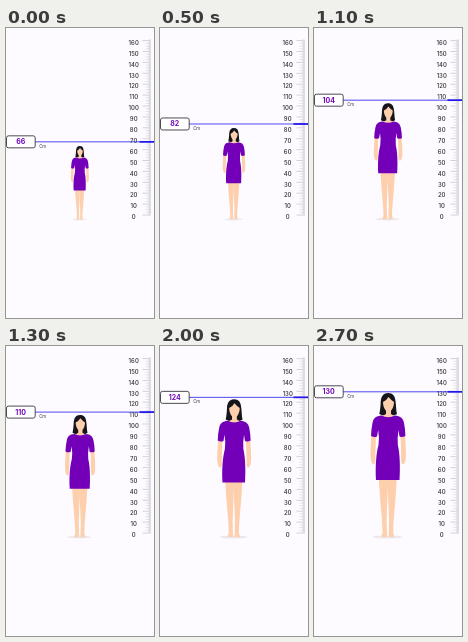
Recreate the animation shown at these times as an HTML page. Size 148 by 290 pixels, loop 3200 ms.

```html
<!DOCTYPE html>
<html lang="en">
<head>
<meta charset="utf-8">
<title>Height picker</title>
<style>
  html, body { margin: 0; width: 100%; height: 100%; overflow: hidden; background: #fdfbff; }
  svg { display: block; width: 148px; height: 290px; }
  text { font-family: Inter, sans-serif; text-anchor: middle; fill: #333; }
  #ruler text { font-size: 6px; font-weight: 500; }
  #value { font-size: 7px; font-weight: 700; fill: #7209b7; }
  #unit { font-size: 4.3px; }
</style>
</head>
<body>
<svg viewBox="0 0 148 290">
  <rect width="148" height="290" fill="#fdfbff"/>
  <g id="ruler"><rect x="142.5" y="11.5" width="2.5" height="176" fill="#dedce2"/></g>
  <g id="figure">
    <ellipse cx="73.5" cy="191" rx="14.5" ry="1.6" fill="#ebe7ec"/>
    <path fill="#17151c" d="M74 47C69 47 67 51 66.700 56C66.500 61 66 65 65.300 68Q69 70.500 74 69.500Q80 70.500 83 68C82 65 82.300 60 81.500 55C81 50 79 47 74 47Z"/>
    <g fill="#fdcfad">
      <path d="M57.500 88C57 98 56 107 56.800 113Q57.500 118 60 118.500Q61.800 117 61.300 111L62 88ZM91 88C91.500 98 92.500 107 91.700 113Q91 118 88.500 118.500Q86.700 117 87.200 111L86.500 88Z"/>
      <path d="M64.800 132H73.800C74 146 73 160 72.600 174L73 191H67.500Q67.300 189 68.500 187C68.700 174 66 158 64.800 132ZM73.800 132H82.800C81.500 158 79.200 174 79.200 187Q80.300 189 80 191H74.700L75 174C74.600 160 73.600 146 73.800 132Z"/>
      <path d="M72 61H77V68L81 70.500Q74.500 74 67.500 70.500L72 68Z"/>
      <path d="M69 56Q72.500 54.500 74.500 51Q77 54 80 56C80 61 77.500 65.800 74.500 65.800S69 61 69 56Z"/>
    </g>
    <path fill="#7300b8" d="M67.500 69.500Q74.300 73 81 69.500C86 70 89 72 90 77Q91.300 83 91.400 90Q88.500 91.800 85.500 90.500L84.500 84Q83.200 92 83.800 99C86 108 86.300 122 85.500 134H62C61.200 122 62 108 64.500 99Q65.500 92 64.200 84L63 90.500Q60 91.800 57 90Q57.200 83 58.500 77C59.500 72 62 70 67.500 69.500Z"/>
  </g>
  <g id="marker">
    <path d="M29 0H148" stroke="#3c35f2" stroke-width=".9"/>
    <path d="M133.500 0H148" stroke="#2217ea" stroke-width="1.7"/>
    <rect x=".5" y="-6" width="28.700" height="12" rx="2" fill="#fff" stroke="#39373f" stroke-width=".9"/>
    <text id="value" x="14.700" y="2.500"></text>
    <text id="unit" x="36.700" y="5.800">Cm</text>
  </g>
</svg>
<script>
  const LOOP = 3200, STEP = 100, LEAD = 40, MAX = 130;
  const UNIT = 1.09; // pixels per centimetre
  // [time in ms, height in cm]
  const keys = [[0, 66.3], [500, 82.5], [900, 98.2], [1300, 110.3],
                [1600, 117.4], [2000, 124.3], [2400, 129.5], [2700, 130]];
  const el = id => document.getElementById(id);

  function slope(i) {
    if (i === keys.length - 1) return 0;
    const a = keys[Math.max(0, i - 1)], b = keys[i + 1];
    return (b[1] - a[1]) / (b[0] - a[0]);
  }

  // Smooth curve through the keys
  function heightAt(t) {
    const last = keys.length - 1;
    if (t >= keys[last][0]) return MAX;
    const i = keys.findIndex(k => k[0] > t) - 1;
    const [t0, h0] = keys[i], [t1, h1] = keys[i + 1];
    const d = t1 - t0, u = (t - t0) / d, w = 1 - u;
    return h0 * (1 + 2 * u) * w * w + h1 * u * u * (3 - 2 * u)
      + d * u * w * (slope(i) * w - slope(i + 1) * u);
  }

  function buildRuler() {
    let marks = "";
    for (let cm = 0; cm <= 160; cm += 2.5) {
      const y = 187 - cm * UNIT, major = cm % 10 === 0;
      marks += `<path d="M${major ? 136.5 : 139.5} ${y}H143" stroke="#c9c6ce" stroke-width="${major ? 0.8 : 0.5}"/>`;
      if (major) marks += `<text x="127.700" y="${y + 4.2}">${cm}</text>`;
    }
    el("ruler").insertAdjacentHTML("beforeend", marks);
  }

  function draw(now) {
    const t = Math.floor((now % LOOP) / STEP) * STEP;
    const height = heightAt(t);
    const lineY = 45.8 + (MAX - heightAt(t + LEAD)) * UNIT;
    el("figure").setAttribute("transform",
      `translate(73.5 192) scale(${height / MAX}) translate(-73.5 -192)`);
    el("marker").setAttribute("transform", `translate(0 ${lineY})`);
    el("value").textContent = Math.floor(height);
  }

  buildRuler();
  const start = performance.now();
  function tick() {
    draw(performance.now() - start);
    requestAnimationFrame(tick);
  }
  tick();
</script>
</body>
</html>
```
